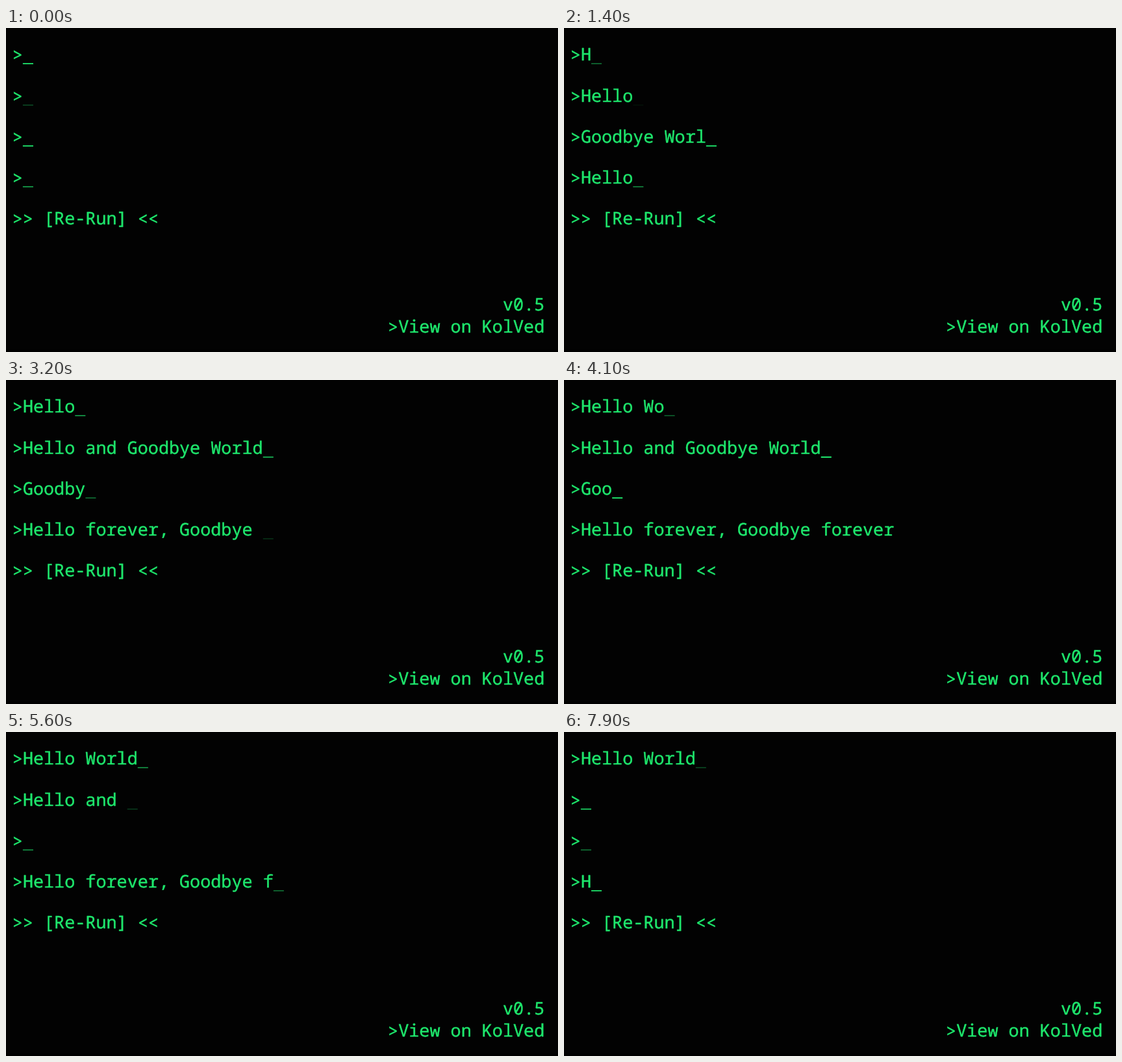
These frames come from a looping animation (850x500 px, 8000 ms). An HTML page:

```html
<!DOCTYPE html>
<html lang="en">
<head>
<meta charset="utf-8">
<title>Typing terminal</title>
<style>
html, body { margin: 0; width: 100%; height: 100%; overflow: hidden; background: #020202; }
svg { display: block; width: 100%; height: 100%; }
text {
  font: 26.8px "Noto Sans Mono", "DejaVu Sans Mono", monospace;
  white-space: pre;
  text-rendering: geometricPrecision;
  stroke: #1ee66c;
  stroke-width: 0.45px;
}
</style>
</head>
<body>
<svg id="stage" viewBox="0 0 850 500" fill="#1ee66c">
  <rect width="850" height="500" fill="#020202"/>
  <rect y="496" width="850" height="4" fill="#000"/>
</svg>
<script>
const LOOP = 8000, STEP = 100, START = 820;
const LEFT = 9.8, CHAR = 16.08;

// typeMs/eraseMs: time per character; eraseAt: first deletion
// blink: cursor period, peak: a moment of full opacity, idle: phase before typing
const rows = [
  { y: 50, str: "Hello World", typeMs: 400, eraseAt: Infinity, eraseMs: 1, blink: 1655, peak: 1897, idle: 0.05 },
  { y: 114, str: "Hello and Goodbye World", typeMs: 100, eraseAt: 4350, eraseMs: 100, blink: 417, peak: 4100, idle: 0.375 },
  { y: 177, str: "Goodbye World", typeMs: 20, eraseAt: 1230, eraseMs: 300, blink: 208, peak: 1390, idle: 0.05 },
  { y: 240, str: "Hello forever, Goodbye forever", typeMs: 100, eraseAt: 5050, eraseMs: 100, blink: 833, peak: 4517, idle: 0.2 }
];

const stage = document.getElementById("stage");

function add(tag, attrs, str = "") {
  const el = document.createElementNS(stage.namespaceURI, tag);
  for (const key in attrs) el.setAttribute(key, attrs[key]);
  el.textContent = str;
  return stage.appendChild(el);
}

// Angle brackets sit slightly lower than the letters.
const mark = (x, y, str) => add("text", { x, y: y + 1 }, str);

for (const row of rows) {
  mark(LEFT, row.y, ">");
  row.line = add("text", { x: LEFT + CHAR, y: row.y });
  row.cursor = add("rect", { y: row.y + 4, width: CHAR, height: 2 });
}

mark(LEFT, 303, ">>");
add("text", { x: LEFT + 3 * CHAR, y: 303 }, "[Re-Run]");
mark(LEFT + 12 * CHAR, 303, "<<");
add("text", { x: 765, y: 436 }, "v0.5");
mark(588.1, 470, ">");
add("text", { x: 588.1 + CHAR, y: 470 }, "View on KolVed");

const clamp = (v, lo, hi) => Math.min(hi, Math.max(lo, v));

function charCount(row, t) {
  const max = row.str.length;
  const typed = clamp(Math.floor((t - START) / row.typeMs), 0, max);
  const erased = t < row.eraseAt ? 0 : Math.floor((t - row.eraseAt) / row.eraseMs) + 1;
  return clamp(typed - erased, 0, max);
}

function cursorOpacity(row, t) {
  const phase = t < START ? t / row.blink + row.idle : (t - row.peak) / row.blink;
  return 1 - 2 * Math.abs(phase - Math.round(phase));
}

function draw(time) {
  const tick = Math.floor((time % LOOP) / STEP) * STEP;
  const t = tick < 200 ? 0 : tick;
  for (const row of rows) {
    const n = charCount(row, t);
    const str = row.str.slice(0, n);
    if (row.line.textContent !== str) row.line.textContent = str;
    row.cursor.setAttribute("x", LEFT + (n + 1) * CHAR);
    row.cursor.setAttribute("opacity", cursorOpacity(row, t).toFixed(3));
  }
}

const begin = performance.now();
function frame() {
  draw(performance.now() - begin);
  requestAnimationFrame(frame);
}
frame();
</script>
</body>
</html>
```
